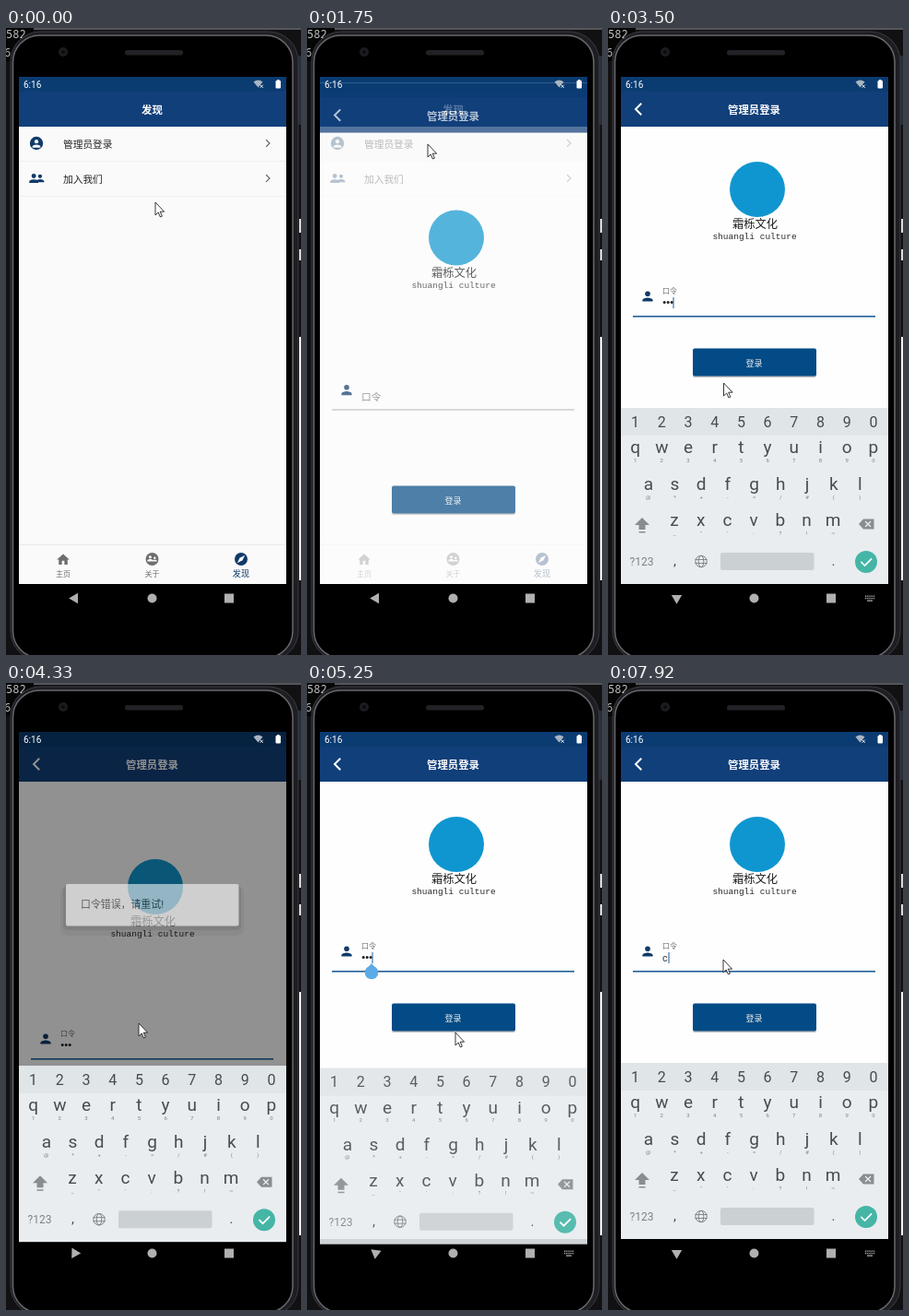
An HTML page for the animation above (8000 ms loop, 320 px wide and 680 px high).

```html
<!DOCTYPE html>
<html lang="zh">
<meta charset="utf-8">
<style>
html, body { margin: 0; width: 100%; height: 100%; overflow: hidden; background: #111113 }
svg { display: block; width: 100%; height: 100% }
text { font-family: Roboto, "Noto Sans CJK SC", "Noto Sans CJK", sans-serif }
.mid { text-anchor: middle }
.line { fill: none; stroke-linecap: square }
</style>
<body>
<script>
const LOOP = 8000, DARK = '#103a68', GREY = '#6e6e70', NAV = '#b0b0b0', PAGE = '#fafafa';

const text = (s, x, y, size, fill, more = '') =>
  `<text x="${x}" y="${y}" font-size="${size}" fill="${fill}" ${more}>${s}</text>`;
const mid = (s, x, y, size, fill, more = '') => text(s, x, y, size, fill, `class="mid" ${more}`);
const mono = (s, x, y) => text(s, x, y, 12, '#c4c4c4', 'style="font-family:\'Noto Sans Mono\',monospace"');
const rect = (x, y, w, h, fill, more = '') =>
  `<rect x="${x}" y="${y}" width="${w}" height="${h}" fill="${fill}" ${more}/>`;
const dot = (x, y, r, fill, more = '') => `<circle cx="${x}" cy="${y}" r="${r}" fill="${fill}" ${more}/>`;
const line = (d, color, w = 1) => `<path class="line" d="${d}" stroke="${color}" stroke-width="${w}"/>`;
const at = (x, y, s, body) => `<g transform="translate(${x} ${y}) scale(${s})">${body}</g>`;

// Icons are drawn around the origin on a 24 unit grid.
const person = fill => dot(0, -4, 4, fill) + `<path d="M-8 8v-2c0-2.7 5.3-4 8-4s8 1.3 8 4v2z" fill="${fill}"/>`;
const disc = (fill, body) => dot(0, 0, 10, fill) + body;
const account = disc(DARK, at(0, 0.5, 0.75, person(PAGE)));
const group = at(-4, 0, 0.85, person(DARK)) + at(5.5, 0, 0.75, person(DARK));
const home = `<path d="M-2 8V2h4v6h5V0h3L0-9-10 0h3v8z" fill="${GREY}"/>`;
const about = disc(GREY, at(-3, -1, 0.55, person(PAGE)) + at(4, 0, 0.45, person(PAGE)));
const compass = disc(DARK, `<path d="M6-6 2 2-6 6-2-2z" fill="${PAGE}"/>`);

const bar = title => rect(14, 53, 290, 17, '#0a3c72') + rect(14, 69, 290, 38, '#113f7a') +
  mid(title, 158.5, 93, 11.4, '#fff', 'font-weight="700"');

const row = (y, icon, label) => at(33, y, 0.72, icon) + text(label, 62, y + 5, 10.7, '#222') +
  line(`M282.5 ${y - 3.5}l3.5 3.5-3.5 3.5`, '#666', 1.2) + rect(14, y + 19, 290, 0.6, '#e8e8e8');

const listPage = rect(14, 53, 290, 550, PAGE) + bar('发现') +
  row(125, account, '管理员登录') + row(163, group, '加入我们') +
  rect(14, 107, 290, 37, '#000', 'id="press"') +
  rect(14, 560, 290, 0.8, '#e6e6e6') +
  at(62, 576.5, 0.68, home) + at(158.5, 576, 0.7, about) + at(255, 576, 0.7, compass) +
  mid('主页', 62, 595, 8, GREY) + mid('关于', 158.5, 595, 8, GREY) + mid('发现', 255, 595, 9.2, DARK);

const loginPage = rect(14, 53, 290, 550, '#fefefe') + bar('管理员登录') + line('M35.5 82.5l-5.5 5.5 5.5 5.5', '#fff', 2) +
  `<g id="logo">${dot(162, 175, 30, '#0f96d0') + mid('霜栎文化', 159.5, 217, 12.3, '#1c1c1c') +
    mid('shuangli culture', 159, 229, 9.5, '#2a2a2a', 'style="font-family:\'Liberation Mono\',monospace"')}</g>` +
  `<g id="field">${at(43, 291, 0.7, person(DARK)) + text('口令', 59, 0, 8, '#707074', 'id="label"') +
    text('请输入管理员口令', 59, 302, 10.7, '#b4b4b4', 'id="hint"') + text('', 59, 302, 10.7, '#333', 'id="typed"') +
    [0, 1, 2].map(i => dot(61.2 + 4 * i, 297.5, 1.5, '#222', `id="dot${i}"`)).join('') +
    rect(0, 292, 1, 12, '#1d5a94', 'id="caret"') + rect(27, 312, 263, 1, '#888', 'id="under"')}
    <g id="handle">${dot(70, 314, 7.3, '#5cabe6')}<path d="M70 304l5 6h-10z" fill="#5cabe6"/></g></g>` +
  `<g id="button">${rect(92, 349, 134, 30, '#000', 'rx="2" opacity=".25"') + rect(92, 347.5, 134, 30, '#034b86', 'rx="2"') +
    mid('登录', 158.5, 366.5, 9, '#eee')}</g>`;

// Keyboard
const KEY = '#474c50', SUB = '#7b8184', BOARD = '#e9edf0', FADED = '#878d91';
const keys = (chars, x, y, size, subs = '') => [...chars].map((c, i) => mid(c, x + 28.7 * i, y, size, KEY) +
  mid(subs[i] || '', x + 28.7 * i, y + 9.5, 6, SUB)).join('');
const keyboard = rect(14, 412, 290, 191, BOARD) + rect(14, 412, 290, 30, '#e0e5e8') +
  keys('1234567890', 29.6, 432.5, 16) + keys('qwertyuiop', 29.6, 461, 19, '1234567890') +
  keys('asdfghjkl', 43.8, 501, 19, '@*+-=/#()') + keys('zxcvbnm', 72, 540, 19, '_"\':?!~') +
  `<path d="M37 531l8 8h-4.5v5h-7v-5H29z" fill="${FADED}"/>` + rect(33.5, 546, 7, 1.5, FADED) +
  `<path d="M272 538l5-5.5h11.5v11H277z" fill="${FADED}"/>` + line('M279.5 535.5l5 5m0-5l-5 5', BOARD, 1.3) +
  mid('?123', 36.5, 583, 12, SUB) + mid(',', 72.5, 583, 15, KEY) + mid('.', 244.5, 583, 15, KEY) +
  dot(101, 578.5, 6.2, 'none', `stroke="${SUB}"`) + line('M95 576.5h12M95 580.5h12', SUB, 0.9) +
  `<ellipse cx="101" cy="578.5" rx="2.8" ry="6.2" fill="none" stroke="${SUB}"/>` +
  rect(122, 569, 101.5, 19, '#cbd0d3', 'rx="2"') +
  dot(280, 579, 12, '#45b5a6') + line('M275 579.5l3.5 3.5 7-7', '#fff', 1.7);

const tinyBoard = [0, 1].map(r => [0, 1, 2, 3, 4].map(i => rect(279 + 2.2 * i, 615.5 + 2.4 * r, 1.3, 1.4, NAV)).join('')).join('') +
  rect(281, 620.5, 6, 1.2, NAV);

document.body.innerHTML = `<svg viewBox="0 0 320 680" preserveAspectRatio="none">
  <clipPath id="screen">${rect(14, 53, 290, 550, '#000')}</clipPath>
  ${rect(0, 0, 320, 680, '#111113')}
  ${rect(0, 0, 320, 2, '#55555a')}${rect(0, 0, 30, 36, '#060606')}
  ${mono('582', 0, 11)}${mono('6', -2, 31)}
  ${rect(317, 30, 3, 75, '#26303c')}${rect(318, 207, 2, 15, '#ddd')}${rect(318, 240, 2, 12, '#ddd')}${rect(318, 335, 2, 264, '#f4f4f4')}
  ${rect(5, 4, 312, 682, '#1e1e22', 'rx="32" stroke="#3a3a40"')}
  ${rect(7.5, 8, 303.5, 675, '#000', 'rx="29" stroke="#68686e" stroke-width="1.5"')}
  ${dot(62, 26, 5, '#1c1c20')}${dot(62, 26, 2, '#0c0c0e')}${rect(129, 24, 63, 5.5, '#222226', 'rx="2.5"')}
  <g clip-path="url(#screen)">
    ${listPage}
    <g id="login">${loginPage}</g>
    ${rect(14, 53, 290, 550, '#000', 'id="shade"')}
    <g id="dialog">
      ${rect(59, 220, 199, 54, '#000', 'rx="8" opacity=".08"')}${rect(62, 219, 193, 49, '#000', 'rx="5" opacity=".14"')}
      ${rect(65, 218, 187.5, 45.5, '#fefefe', 'rx="2"')}${text('口令错误，请重试!', 81, 244, 10.9, '#333')}
    </g>
    ${text('6:16', 19, 64.5, 10, '#fff')}
    <path d="M268.5 58.5q5-4 10 0l-5 6z" fill="#a9b4c0"/>${line('M276 62l2.5 2.5m0-2.5l-2.5 2.5', '#fff', 0.9)}
    ${rect(292.5, 57, 5.5, 8.5, '#fff', 'rx="1"')}${rect(294, 56, 2.5, 1.5, '#fff')}
  </g>
  <path id="back" d="M-6.3 0l9.8-5.7v11.4z" fill="${NAV}"/>
  ${dot(158.5, 618.5, 5, NAV)}${rect(237, 613.5, 10, 10, NAV)}
  <g id="tiny">${tinyBoard}</g>
  <g id="keyboard">${keyboard}</g>
  <path id="mouse" d="M0 0v14l3.2-3 2.2 5 2-.9-2.2-4.9h4.4z" fill="#fff" stroke="#222" stroke-width=".9"/>
</svg>`;

const $ = id => document.getElementById(id);
const set = (id, attrs) => { for (const k in attrs) $(id).setAttribute(k, attrs[k]); };
const show = (id, on) => set(id, { opacity: +on });
const move = (id, x, y, more = '') => set(id, { transform: `translate(${x} ${y}) ${more}` });
const ramp = (t, start, span) => Math.min(1, Math.max(0, (t - start) / span));
const ease = p => p * p * (3 - 2 * p);
const within = (t, a, b) => t >= a && t < b;

// Time, x, y of the pointer
const PATH = [[80, 162, 189], [420, 131, 126], [1830, 131, 126], [2170, 125, 377], [2250, 125.5, 385], [3750, 125.5, 385],
  [4080, 144, 369], [4830, 144, 369], [4920, 161, 379], [5400, 161, 379], [5800, 125, 300]];

function pointer(t) {
  const i = PATH.findIndex(p => p[0] > t);
  if (i < 0) return PATH[PATH.length - 1].slice(1);
  if (!i) return PATH[0].slice(1);
  const [a, b] = [PATH[i - 1], PATH[i]], p = ease(ramp(t, a[0], b[0] - a[0]));
  return [a[1] + (b[1] - a[1]) * p, a[2] + (b[2] - a[2]) * p];
}

// Open, close, open again
const toggle = (t, lag, span) =>
  ramp(t, 2450 + lag, span) - ramp(t, 4270, span) + ramp(t, 5090 + lag, span);

function draw(t) {
  const enter = ramp(t, 1560, 300);
  show('press', 0.1 * ramp(t, 1420, 120) * (1 - enter));
  show('login', ease(enter));
  move('login', 0, 137 * (1 - enter) ** 3);

  const full = t < 2480 || within(t, 4290, 5150) ? 1 : 0;
  move('logo', 0, 46 * full);
  move('field', 0, 95 * full);
  move('button', 0, 142.5 * full);

  const dots = t < 5900 ? (t >= 3250) + (t >= 3330) + (t >= 3420) : (t < 6920) + (t < 6750) + (t < 6580);
  const typed = t >= 7580 ? 'c' : '';
  const float = ramp(t, 2420, 150);
  set('label', { y: 302 - 14 * float, 'font-size': 10.7 - 2.7 * float });
  show('hint', dots || typed ? 0 : ramp(t, 2430, 130));
  for (let i = 0; i < 3; i++) show('dot' + i, i < dots);
  $('typed').textContent = typed;
  set('caret', { x: typed ? 65.5 : 59.5 + (dots ? 4 * dots - 1 : 0) });
  show('caret', t >= 2450 && !within(t, 4000, 4500) && !within(t, 7080, 7330));
  const focus = within(t, 2560, 4450) || t >= 5150;
  set('under', { height: focus ? 1.6 : 0.9, fill: focus ? '#225f98' : '#8c8c8c' });
  show('handle', within(t, 5150, 6080));

  const fade = ramp(t, 4190, 170) - ramp(t, 5085, 120);
  show('shade', 0.52 * fade);
  show('dialog', fade ** 3);
  move('dialog', 0, 95 * ease(ramp(t, 4330, 130)));

  move('back', 74.5, 618.5, `rotate(${-90 * toggle(t, 0, 175)})`);
  show('tiny', within(t, 2480, 4290) || t >= 5150);
  const k = toggle(t, 40, 230);
  move('keyboard', 0, 12 * (1 - k));
  show('keyboard', Math.min(1, 1.7 * k));
  move('mouse', ...pointer(t));
}

function frame() {
  draw(performance.now() % LOOP);
  requestAnimationFrame(frame);
}
frame();
</script>
</body>
</html>
```
